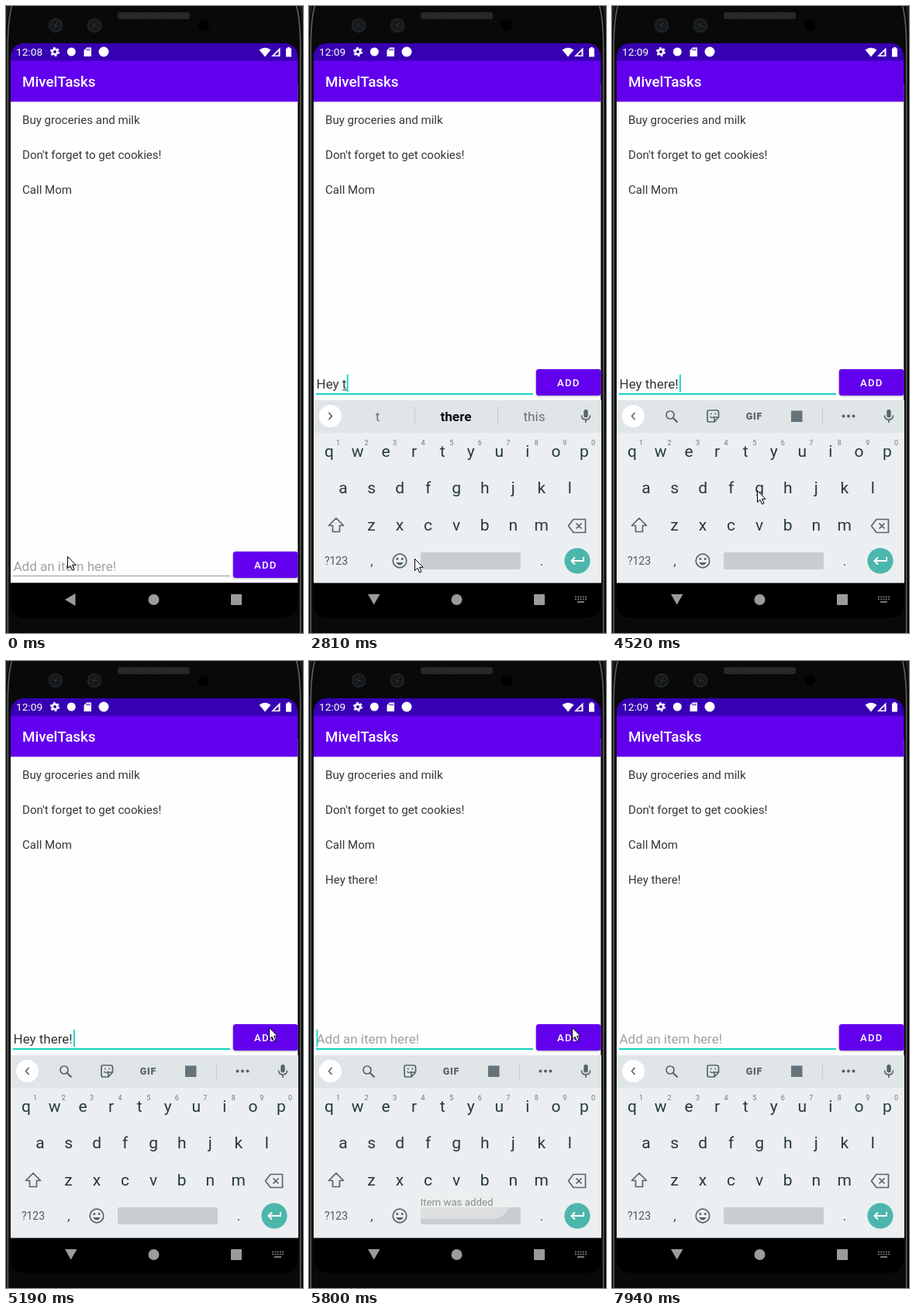
An HTML page that plays this animation: 383x808 px, repeating every 8000 ms.

```html
<!DOCTYPE html>
<html lang="en">
<head>
<meta charset="utf-8">
<title>To-do list</title>
<style>
html, body { margin: 0; width: 100%; height: 100%; overflow: hidden; background: #070707; }
svg { display: block; width: 100vw; height: 100vh; }
text { font-family: Roboto, "Noto Sans", sans-serif; white-space: pre; }
.list { font-size: 15.07px; fill: #363636; }
.field { font-size: 17px; fill: #363636; }
.mid { text-anchor: middle; }
.key { font-size: 21px; fill: #263840; }
.digit { font-size: 9px; fill: #6d777c; }
.word { font-size: 17.2px; fill: #66727a; }
.word .top { font-weight: 700; fill: #0c0c0c; }
.line { fill: none; stroke: #56646b; stroke-width: 1.7; stroke-linejoin: round; }
</style>
</head>
<body>
<svg viewBox="0 0 383 808">
  <defs>
    <pattern id="mesh" width="3" height="3" patternUnits="userSpaceOnUse">
      <rect width="3" height="3" fill="#303030"/><path d="M0 3L3 0" stroke="#171717"/>
    </pattern>
    <filter id="lift" x="-10%" y="-20%" width="120%" height="150%">
      <feDropShadow dx="0" dy="1" stdDeviation=".9" flood-opacity=".3"/>
    </filter>
    <clipPath id="screen"><rect x="6" y="48" width="370.300" height="740.600" rx="17"/></clipPath>
  </defs>

  <!-- phone body -->
  <rect width="383" height="808" fill="#090909"/>
  <path d="M2.300 808V52Q2.500 16 8 -2M379.700 808V52Q379.500 16 374 -2" fill="none" stroke="#5c5c5c" stroke-width="1.700"/>
  <path d="M0 40Q1 12 5 0H0ZM383 40Q382 12 378 0H383Z" fill="#1c1c1c"/>
  <rect x="144" y="8" width="93" height="9" rx="3" fill="url(#mesh)"/>
  <g id="lenses"></g>
  <circle cx="255" cy="25" r="7" fill="#000"/>

  <g clip-path="url(#screen)">
    <rect x="6" y="48" width="371" height="741" fill="#000"/>
    <rect x="6" y="100" width="371" height="643.300" fill="#fefefe"/>
    <rect x="6" y="70" width="371" height="53.400" fill="#6200ee"/>
    <rect x="6" y="48" width="371" height="22.600" fill="#3700b3"/>

    <!-- status bar -->
    <g fill="#fff">
      <g font-size="13.7">
        <text class="early" x="13" y="64.200">12:08</text>
        <text class="late" x="13" y="64.200">12:09</text>
      </g>
      <circle cx="63" cy="59" r="3.3" fill="none" stroke="#fff" stroke-width="2.600"/>
      <circle cx="63" cy="59" r="5.100" fill="none" stroke="#fff" stroke-width="2" stroke-dasharray="2.670"/>
      <circle cx="84.300" cy="59" r="5.500"/>
      <path d="M104 53.500H110V65H100.500V57Z"/>
      <path d="M104 55v2.500m2-2.500v2.500m2-2.500v2.500" stroke="#3700b3"/>
      <circle cx="126" cy="59" r="6.500"/>
      <path d="M326.500 56.500Q334 51 341.500 56.500L334 65.500Z"/>
      <path d="M353.500 53.500V65H342Z"/>
      <path d="M351.500 58V63.500H346Z" fill="#3700b3"/>
      <path d="M361 54.500H363V53H366V54.500H368V65.500H361Z"/>
    </g>
    <text x="21" y="104" font-size="18.8" font-weight="500" fill="#fff">MivelTasks</text>

    <g class="list">
      <text x="21" y="151.600">Buy groceries and milk</text>
      <text x="21" y="196.800">Don't forget to get cookies!</text>
      <text x="21" y="242">Call Mom</text>
      <text id="added" x="21" y="287.200">Hey there!</text>
    </g>

    <!-- entry row -->
    <g id="entry">
      <path class="early" d="M9 499.500H289" stroke="#979797"/>
      <path class="late" d="M9 500H289" stroke="#12d3c4" stroke-width="2"/>
      <text id="hint" class="field" x="9.500" y="493" style="fill:#a2a2a2">Add an item here!</text>
      <g id="typed" class="field"></g>
      <rect id="caret" y="475" width="1.800" height="22.500" fill="#12d3c4"/>
      <rect x="292.800" y="468" width="83.700" height="34" rx="3.500" fill="#6200ee" filter="url(#lift)"/>
      <rect id="ripple" x="292.800" y="468" width="83.700" height="34" rx="3.500" fill="#fff"/>
      <text x="320" y="490" font-size="13.2" font-weight="500" letter-spacing="1.2" fill="#fff">ADD</text>
    </g>

    <!-- keyboard -->
    <g class="late">
      <rect x="6" y="508" width="371" height="235.300" fill="#ebeff2"/>
      <rect x="6" y="508" width="371" height="42" fill="#e0e5e8"/>
      <circle cx="27.500" cy="528.500" r="14.500" fill="#fff"/>
      <g id="words" class="word"></g>
      <g id="tools" class="line">
        <path d="M29.500 524L25.500 528.500L29.500 533"/>
        <circle cx="75" cy="527" r="5"/><path d="M78.700 530.700L84.500 536.500" stroke-width="2.200"/>
        <path d="M125 521H135Q137.500 521 137.500 523.500V530L132 536H125Q123 536 123 533.500V523Q123 521 125 521ZM132 536V530H137.500M126.500 529Q129 532 132 529"/>
        <path d="M127 525.500h1.500m4 0h1.500" stroke-width="2"/>
        <text class="mid" x="183.500" y="532.500" font-size="12.5" font-weight="900" letter-spacing=".8" fill="#56646b" stroke="none">GIF</text>
        <rect x="231" y="521.500" width="14.500" height="14.500" fill="#66737a" stroke="none"/>
        <path d="M271.500 518V539" stroke="#c8ced1" stroke-width="1"/>
        <g fill="#56646b" stroke="none"><circle cx="298.500" cy="528.500" r="2"/><circle cx="305" cy="528.500" r="2"/><circle cx="311.500" cy="528.500" r="2"/></g>
      </g>
      <rect x="354.300" y="520" width="5.400" height="10.500" rx="2.700" fill="#56646b"/>
      <path class="line" d="M351.500 527.500Q351.500 533 357 533T362.500 527.500M357 533V537"/>
      <g id="keys"></g>
      <path class="line" d="M35 660L25.500 669.500H30.500V677.500H39.500V669.500H44.500Z"/>
      <path class="line" d="M341 661.500H356.500V678.500H341L334.500 670ZM344.500 666.500L351.500 673.500M351.500 666.500L344.500 673.500"/>
      <text class="mid" x="35" y="720.300" font-size="14" fill="#4a5a62">?123</text>
      <text class="mid" x="81" y="721" font-size="17" fill="#37474f">,</text>
      <text class="mid" x="300" y="721" font-size="17" fill="#37474f">.</text>
      <circle class="line" cx="117" cy="715" r="8.800"/>
      <path d="M112 717H122Q117 724 112 717Z" fill="#56646b"/>
      <circle cx="113.800" cy="712.500" r="1.500" fill="#56646b"/><circle cx="120.200" cy="712.500" r="1.500" fill="#56646b"/>
      <rect x="144" y="704" width="129" height="22" rx="2" fill="#c9cdd0"/>
      <circle cx="346" cy="715" r="16.600" fill="#4db6ac"/>
      <path d="M354 710V715H338.500M343 710.500L338.500 715L343 719.500" fill="none" stroke="#fff" stroke-width="2"/>
    </g>

    <g id="toast">
      <rect x="124" y="677" width="134.500" height="42" rx="21" fill="#eeefef"/>
      <text class="mid" x="190.500" y="702.300" font-size="13.3" fill="#333">Item was added</text>
    </g>

    <!-- navigation bar -->
    <g fill="#9b9b9b">
      <path class="early" d="M76 765L89.500 757V773Z"/>
      <path class="late" d="M76 758H91.500L83.700 771.500Z"/>
      <circle cx="190.500" cy="765" r="7"/>
      <rect x="290" y="758" width="14" height="14" rx="1"/>
      <g class="late" fill="none" stroke="#8c8c8c" stroke-width="1.700">
        <path d="M343 761.500H358M343 764.500H358" stroke-dasharray="1.900 1.375"/>
        <path d="M346 768H355"/>
      </g>
    </g>
  </g>

  <path id="pointer" d="M.5 .5V15.500L4 12.300L6.500 18L9 16.900L6.500 11.300H11Z" fill="#fff" stroke="#000"/>
</svg>

<script>
const LOOP = 8000;
const $ = id => document.getElementById(id);
const sheet = document.head.appendChild(document.createElement('style'));
let count = 0;

// Stepped looping keyframes from [ms, value] pairs
function track(sel, prop, steps) {
  const name = 'k' + count++;
  const frames = steps.map(([t, v]) => `${t / LOOP * 100}%{${prop}:${v}}`).join('');
  sheet.textContent += `@keyframes ${name}{${frames}}
    ${sel}{animation:${name} ${LOOP}ms step-end infinite}\n`;
}
function show(sel, from, to = LOOP) {
  const steps = [[0, from ? 0 : 1]];
  if (from) steps.push([from, 1]);
  if (to < LOOP) steps.push([to, 0]);
  track(sel, 'opacity', steps);
}
const move = (sel, steps) =>
  track(sel, 'transform', steps.map(([t, x, y]) => [t, `translate(${x}px,${y}px)`]));

$('lenses').innerHTML = [64, 114].map(x =>
  `<circle cx="${x}" cy="25" r="9.500" fill="#1d2023"/><circle cx="${x}" cy="25" r="6" fill="#111416"/>
   <circle cx="${x}" cy="25" r="3.500" fill="none" stroke="#3b4146" stroke-dasharray="3 2.500"/>
   <circle cx="${x}" cy="25" r="1.200" fill="#3d4348"/>`).join('');

// Letter rows
const rows = [['qwertyuiop', 26, 580.500], ['asdfghjkl', 44, 628], ['zxcvbnm', 80.500, 675.500]];
$('keys').innerHTML = rows.map(([letters, x0, y], r) => [...letters].map((c, i) => {
  const x = x0 + i * 36.550;
  const digit = r ? '' : `<text class="digit mid" x="${x + 11.500}" y="565.500">${(i + 1) % 10}</text>`;
  return `<text class="key mid" x="${x}" y="${y}">${c}</text>${digit}`;
}).join('')).join('');

// Typed text: start, end, text, caret x
const typing = [
  [2810, 2950, 't', 48.800], [2950, 3110, 'th', 58.200], [3110, 3360, 'the', 67.200],
  [3360, 3480, 'ther', 73], [3480, 3970, 'there', 82.500], [3970, 5560, 'there!', 87]
];
$('typed').innerHTML = typing.map(([, , s, x], i) =>
  `<g id="typed${i}"><text x="9.500" y="493">Hey ${s}</text>` +
  (s.endsWith('!') ? '' : `<path d="M43.500 494.800H${x}" stroke="#363636" stroke-width="1.200"/>`) + '</g>').join('');
typing.forEach(([from, to], i) => show('#typed' + i, from, to));

// Suggestion strip; a leading * marks the bold word
const words = [
  [2810, 2950, 't *there this'], [2950, 3110, 'th *there this'], [3110, 3360, 'the *there they'],
  [3360, 3480, 'ther *there where'], [3480, 4090, "there there's where"]
];
$('words').innerHTML = words.map(([, , list], i) => `<g id="words${i}">` +
  list.split(' ').map((w, n) =>
    `<text class="mid ${w[0] === '*' ? 'top' : ''}" x="${88.500 + n * 101}" y="535">${w.replace('*', '')}</text>`).join('') +
  `<path class="line" d="M25.500 524L29.500 528.500L25.500 533"/>
   <path d="M136.500 517V539M243.500 517V539" stroke="#c4cbce"/></g>`).join('');
words.forEach(([from, to], i) => show('#words' + i, from, to));

show('.early', 0, 2810);
show('.late', 2810);
show('#tools', 4090);
show('#added', 5560);
track('#hint', 'opacity', [[0, 1], [2810, 0], [5560, 1]]);
move('#entry', [[0, 0, 235], [2810, 0, 0]]);
track('#ripple', 'opacity', [[0, 0], [5440, .2], [5560, .12], [5680, .05], [5800, 0]]);
track('#toast', 'opacity', [[0, 0], [5800, .52], [5950, .78], [6070, .92], [6210, 1],
  [7550, .8], [7670, .45], [7820, .15], [7940, 0]]);

// Caret: place and blink are separate properties of one animation
const caretX = [[0, 9.500], ...typing.map(([t, , , x]) => [t, x]), [5560, 9.500]];
const blink = [[0, 0], [2810, 1], [4670, 0], [5190, 1], [6070, 0], [6490, 1], [7030, 0], [7550, 1], [7940, 0]];
const at = (steps, t) => steps.filter(s => s[0] <= t).pop()[1];
const times = [...new Set([...caretX, ...blink].map(s => s[0]))].sort((a, b) => a - b);
track('#caret', 'transform', times.map(t =>
  [t, `translate(${at(caretX, t)}px,0);opacity:${at(blink, t)}`]));

move('#pointer', [
  [0, 79, 709], [1300, 299, 786], [1430, 0, 900], [1710, 315, 804], [1860, 0, 900],
  [2810, 136, 712], [4210, 185, 622], [4520, 187, 624], [4670, 280, 540], [4790, 365, 460],
  [4940, 368, 464], [5190, 339, 472], [6210, 0, 900], [6890, 84, 781], [7030, 292, 795], [7150, 0, 900]
]);
</script>
</body>
</html>
```
